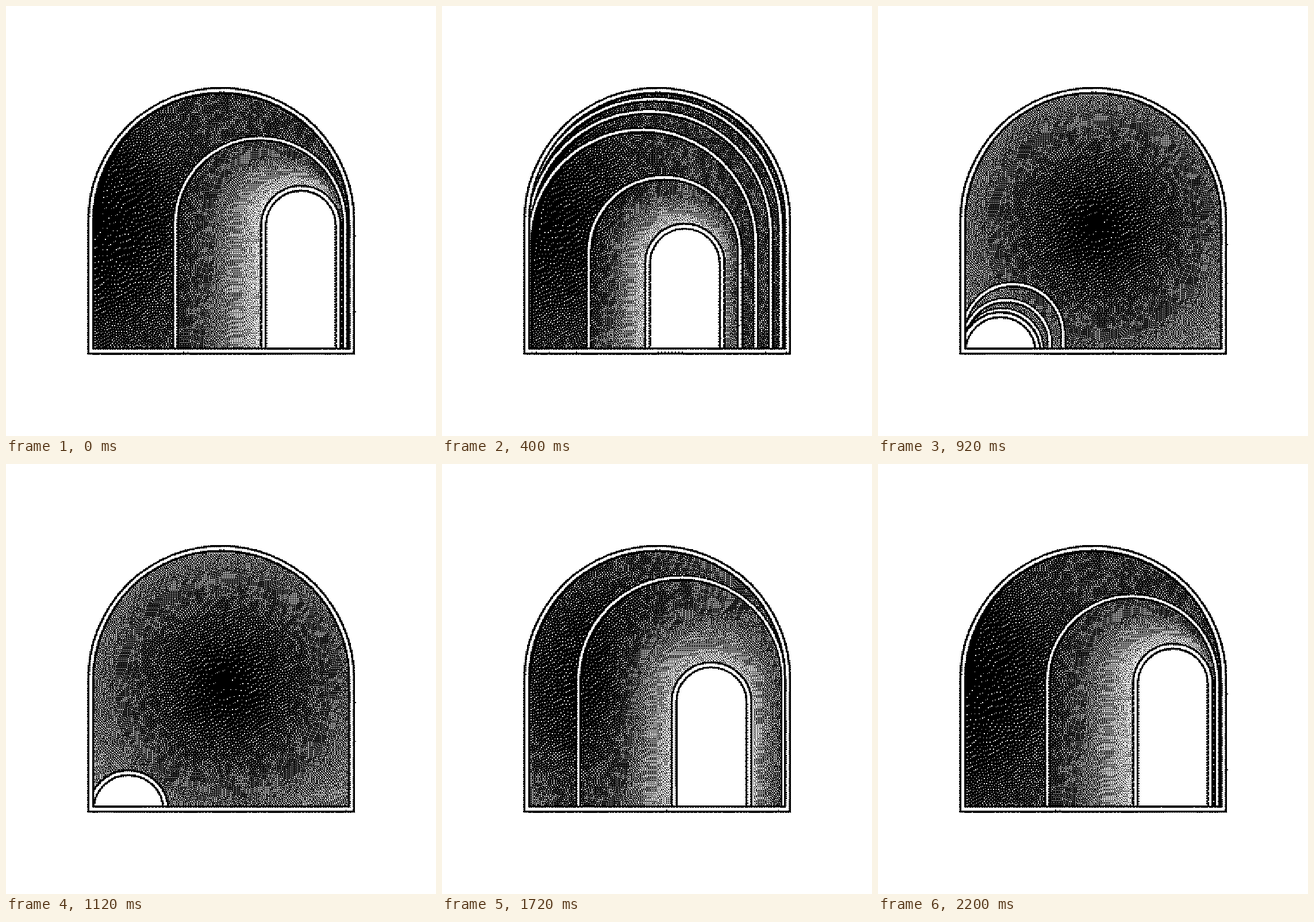
Recreate the animation shown at these times as an HTML page with a canvas. Size 748 by 748 pixels, loop 2240 ms.

```html
<!DOCTYPE html>
<html lang="en">
<head>
<meta charset="utf-8">
<title>Arches</title>
<style>
html, body { margin: 0; width: 100%; height: 100%; overflow: hidden; background: #fff; }
canvas { display: block; width: 748px; height: 748px; image-rendering: pixelated; }
</style>
</head>
<body>
<canvas width="500" height="500"></canvas>
<script>
const SIZE = 748, N = 500, LOOP = 2240, HALF = LOOP / 2, STEP = 40, FLOOR = 600.3;
const view = document.querySelector('canvas').getContext('2d');
const buffer = document.createElement('canvas');
buffer.width = buffer.height = N;
const ctx = buffer.getContext('2d', { willReadFrequently: true });

const lerp = (a, b, k) => a + (b - a) * k;
const white = alpha => `rgba(255,255,255,${alpha})`;

// Quadratic ease-in-out from 0 to 1
function ease(t, start, duration) {
  const x = Math.min(1, Math.max(0, (t - start) / duration));
  return x < .5 ? 2 * x * x : 1 - 2 * (1 - x) ** 2;
}

// Arches are semicircles on legs: centre x, crown height and radius
const mix = (a, b, k) => ({ x: lerp(a.x, b.x, k), top: lerp(a.top, b.top, k), r: lerp(a.r, b.r, k) });
const frame = { x: 374.4, top: 146.5, r: 227 };
const doorHigh = { x: 513, top: 317, r: 65 };
const doorLow = { x: 213, top: 537, r: 65 };
const doorAt = u => mix(doorHigh, doorLow, u);

function arch({ x, top, r }) {
  ctx.beginPath();
  ctx.moveTo(x - r, FLOOR);
  ctx.arc(x, top + r, r, Math.PI, 0);
  ctx.lineTo(x + r, FLOOR);
  ctx.closePath();
}

function fill(shape, style) {
  arch(shape);
  ctx.fillStyle = style;
  ctx.fill();
}

function outline(shape, outer, inner) {
  arch(shape);
  for (const [width, style] of [[outer, '#000'], [inner, '#fff']]) {
    ctx.lineWidth = width;
    ctx.strokeStyle = style;
    ctx.stroke();
  }
}

// A ring hides inside the frame at depth 0 and inside the door at depth 1
function drawRing(depth, u, light, door) {
  if (depth < .003 || depth > .997) return;
  const shape = mix(frame, doorAt(u), depth);
  fill(shape, white(.06 * depth));
  if (light) drawGlow(shape, door, light);
  outline(shape, 10, 4);
}

function drawGlow(from, to, strength) {
  const steps = 16;
  let before = 1;
  for (let i = 1; i <= steps; i++) {
    const k = i / steps, after = 1 - strength * k * k;
    fill(mix(from, to, k), white(1 - after / before));
    before = after;
  }
}

function drawWall(t) {
  const k = ease(t, 200, 700) - ease(t, 1400, 800);
  const x = lerp(130, 385, k), light = lerp(.18, .42, k ** 3);
  const tone = ctx.createRadialGradient(x, 385, 0, x, 385, 270);
  tone.addColorStop(0, white(0));
  tone.addColorStop(.5, white(light * .35));
  tone.addColorStop(1, white(light));
  fill(frame, '#000');
  fill(frame, tone);
}

function drawScene(t) {
  ctx.setTransform(1, 0, 0, 1, 0, 0);
  ctx.fillStyle = '#fff';
  ctx.fillRect(0, 0, N, N);
  ctx.scale(N / SIZE, N / SIZE);
  drawWall(t);

  ctx.save();
  arch(frame);
  ctx.clip();
  const door = doorAt(ease(t, 80, 823) - ease(t, 1210, 700));

  // Three quick rings, the latest one outermost
  for (let i = 2; i >= 0; i--) {
    const depth = ease(t, 135 + 70 * i, 872);
    drawRing(depth, Math.min(1, .88 + .25 * depth));
  }

  // One slow ring: half way in while the door returns, the rest as it leaves
  const late = (t + HALF) % LOOP;
  const depth = .49 * ease(late, 239, 645) + .51 * ease(late, 1267, 808);
  drawRing(depth, ease(late, 1131, 880), .85 * Math.min(1, 3 * depth), door);

  fill(door, '#fff');
  outline(door, 12, 4.7);
  ctx.restore();
  outline(frame, 12.4, 4.7);
}

// One-bit rendering by Floyd-Steinberg error diffusion
function toOneBit() {
  const image = ctx.getImageData(0, 0, N, N), px = image.data;
  const tone = new Float32Array(N * N);
  for (let i = 0; i < N * N; i++) tone[i] = px[i * 4];
  for (let i = 0; i < N * N; i++) {
    const v = tone[i] < 128 ? 0 : 255, err = (tone[i] - v) / 16;
    px[i * 4] = px[i * 4 + 1] = px[i * 4 + 2] = v;
    tone[i + 1] += err * 7;
    tone[i + N - 1] += err * 3;
    tone[i + N] += err * 5;
    tone[i + N + 1] += err;
  }
  view.putImageData(image, 0, 0);
}

let shown = -1;
const began = performance.now();
function tick() {
  const t = Math.floor((performance.now() - began) % LOOP / STEP) * STEP;
  if (t !== shown) {
    shown = t;
    drawScene(t);
    toOneBit();
  }
  requestAnimationFrame(tick);
}
tick();
</script>
</body>
</html>
```
